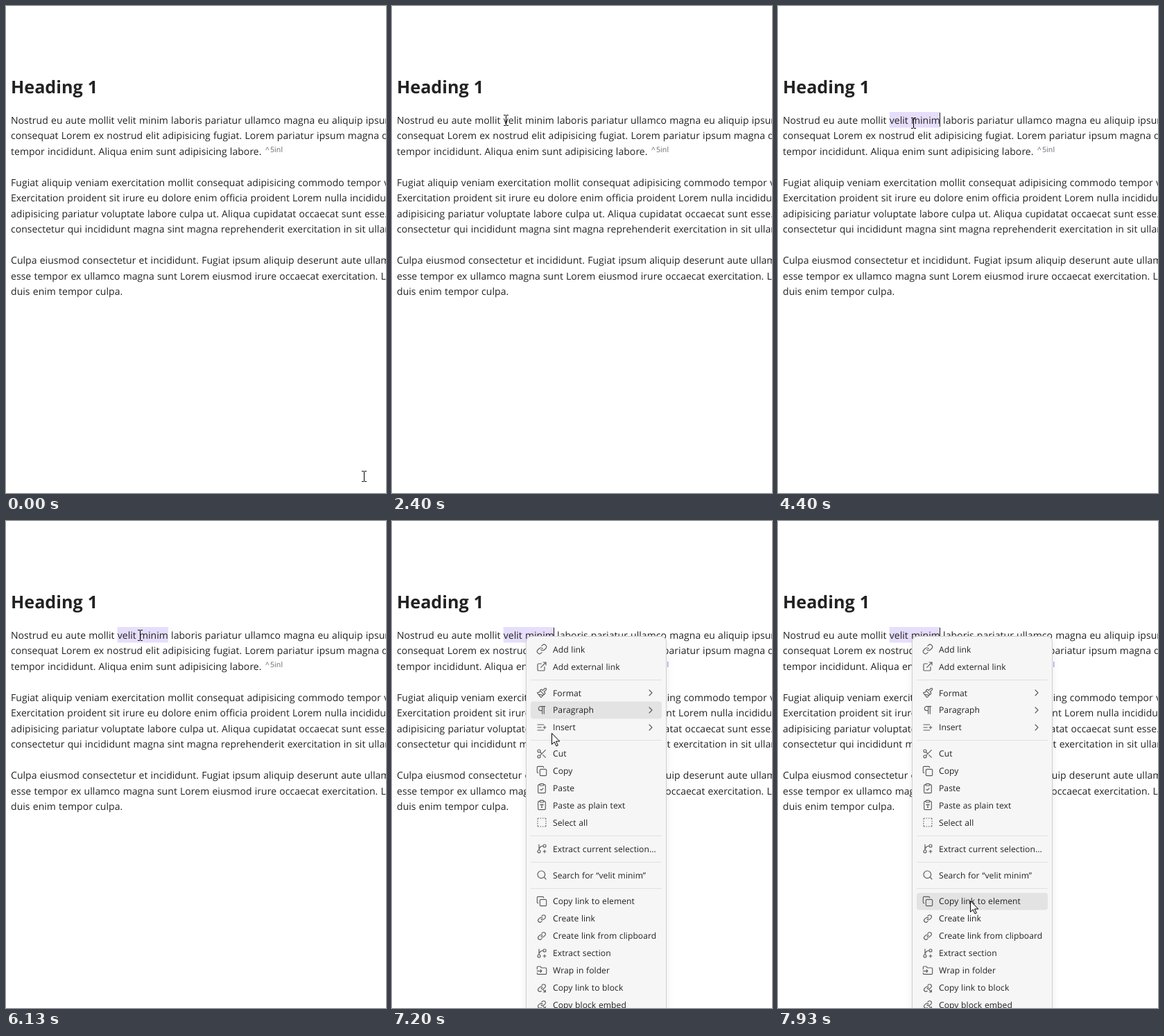
An HTML page for the animation above (8000 ms loop, 548 px wide and 703 px high).

```html
<!DOCTYPE html>
<html lang="en">
<head>
<meta charset="utf-8">
<title>Context menu</title>
<style>
  html, body { margin: 0; width: 100%; height: 100%; overflow: hidden; background: #fff; }
  svg { display: block; }
  text { font: 14px "Open Sans", "Noto Sans", sans-serif; fill: #222; letter-spacing: .05px; word-spacing: .45px; text-rendering: geometricPrecision; }
  .heading { font-size: 25.2px; font-weight: 700; letter-spacing: 0; }
  .block-id { font-size: 10.6px; fill: #6b6570; }
  .open .block-id { fill: #8a5cf5; }
  .panel { fill: #f6f6f6; stroke: #cfcfcf; filter: drop-shadow(0 2px 5px rgb(0 0 0 / .08)); }
  #menu { display: none; }
  .open #menu { display: inline; }
  #menu text { font-size: 12.13px; word-spacing: .4px; }
  .icon { fill: none; stroke: #5c5c5c; stroke-width: 1.75; stroke-linecap: round; stroke-linejoin: round; }
</style>
</head>
<body>
<svg id="stage" width="548" height="703" viewBox="0 0 548 703">
  <rect id="selection" y="153" height="22.5" fill="#e7defb"/>
  <g id="page">
    <text class="heading" x="7" y="125.5">Heading 1</text>
    <text class="block-id" x="374" y="211">^<tspan x="381">5inl</tspan></text>
  </g>
  <rect id="caret" y="154" width="1" height="20" fill="#222"/>
  <g id="menu">
    <rect class="panel" x="193.5" y="166.5" width="202" height="600" rx="8"/>
    <rect id="hover" x="200" width="189" height="24.9" rx="4" fill="#e3e3e3"/>
  </g>
  <path id="beam" d="M-3 -7.5h3m1 0h3M.5 -7v14M-3 7.5h3m1 0h3" fill="none" stroke="#000"/>
  <path id="arrow" d="M.5 .5v16l3.7-3.6 2.8 6 2.3-1-2.8-5.9h5.3z" fill="#fff" stroke="#000"/>
</svg>
<script>
const $ = id => document.getElementById(id);
const stage = $('stage');

function add(parent, tag, attrs, content = '') {
  const el = document.createElementNS('http://www.w3.org/2000/svg', tag);
  for (const name in attrs) el.setAttribute(name, attrs[name]);
  el.textContent = content;
  parent.append(el);
  return el;
}
function set(el, attrs) {
  for (const name in attrs) el.setAttribute(name, attrs[name]);
}

// Document text; empty strings are blank lines
const lines = [
  'Nostrud eu aute mollit velit minim laboris pariatur ullamco magna eu aliquip ipsum',
  'consequat Lorem ex nostrud elit adipisicing fugiat. Lorem pariatur ipsum magna dolor',
  'tempor incididunt. Aliqua enim sunt adipisicing labore.',
  '',
  'Fugiat aliquip veniam exercitation mollit consequat adipisicing commodo tempor velit',
  'Exercitation proident sit irure eu dolore enim officia proident Lorem nulla incididunt',
  'adipisicing pariatur voluptate labore culpa ut. Aliqua cupidatat occaecat sunt esse.',
  'consectetur qui incididunt magna sint magna reprehenderit exercitation in sit ullamco',
  '',
  'Culpa eiusmod consectetur et incididunt. Fugiat ipsum aliquip deserunt aute ullamco',
  'esse tempor ex ullamco magna sunt Lorem eiusmod irure occaecat exercitation. Labore',
  'duis enim tempor culpa.',
].map((line, i) => add($('page'), 'text', { x: 7, y: Math.floor(170 + 22.5 * i) }, line));

const clipboard = 'M9 2h6a1 1 0 0 1 1 1v2a1 1 0 0 1-1 1H9a1 1 0 0 1-1-1V3a1 1 0 0 1 1-1zM16 4h2a2 2 0 0 1 2 2v14a2 2 0 0 1-2 2H6a2 2 0 0 1-2-2V6a2 2 0 0 1 2-2h2';
const smallLink = 'M10.5 13a4 4 0 0 0 6 .4l2.4-2.4a4 4 0 0 0-5.7-5.7l-1.3 1.4M13.5 11a4 4 0 0 0-6-.4l-2.4 2.4a4 4 0 0 0 5.7 5.7';
const icons = {
  link: 'M10 13a5 5 0 0 0 7.54.54l3-3a5 5 0 0 0-7.07-7.07l-1.72 1.71M14 11a5 5 0 0 0-7.54-.54l-3 3a5 5 0 0 0 7.07 7.07l1.71-1.71',
  external: 'M15 3h6v6M10 14 21 3M18 13v6a2 2 0 0 1-2 2H5a2 2 0 0 1-2-2V8a2 2 0 0 1 2-2h6',
  brush: 'M18.37 2.63 14 7l-1.59-1.59a2 2 0 0 0-2.82 0L8 7l9 9 1.59-1.59a2 2 0 0 0 0-2.82L17 10l4.37-4.37a2.12 2.12 0 1 0-3-3ZM9 8c-2 3-4 3.5-7 4l8 10c2-1 6-5 6-7M14.5 17.5 4.5 15',
  pilcrow: 'M13 4v16M17 4v16M19 4H9.5a4.5 4.5 0 0 0 0 9H13',
  insert: 'M11 12H3M16 6H3M16 18H3M18 9v6M21 12h-6',
  scissors: 'M9 6a3 3 0 1 1-6 0 3 3 0 0 1 6 0zM9 18a3 3 0 1 1-6 0 3 3 0 0 1 6 0zM20 4 8.12 15.88M14.47 14.48 20 20M8.12 8.12 12 12',
  copy: 'M10 8h10a2 2 0 0 1 2 2v10a2 2 0 0 1-2 2H10a2 2 0 0 1-2-2V10a2 2 0 0 1 2-2zM4 16c-1.1 0-2-.9-2-2V4c0-1.1.9-2 2-2h10c1.1 0 2 .9 2 2',
  paste: clipboard + 'M9 14l2 2 4-4',
  plain: clipboard + 'M9 12v-1h6v1M11 17h2M12 11v6',
  dashed: 'M5 3a2 2 0 0 0-2 2M19 3a2 2 0 0 1 2 2M21 19a2 2 0 0 1-2 2M5 21a2 2 0 0 1-2-2M9 3h1M9 21h1M14 3h1M14 21h1M3 9v1M21 9v1M3 14v1M21 14v1',
  branch: 'M6 3v12M18 9a3 3 0 1 0 0-6 3 3 0 0 0 0 6zM6 21a3 3 0 1 0 0-6 3 3 0 0 0 0 6zM15 6a9 9 0 0 0-9 9M18 15v6M21 18h-6',
  search: 'M19 11a8 8 0 1 1-16 0 8 8 0 0 1 16 0zM21 21l-4.3-4.3',
  small: smallLink + 'l1.3-1.4',
  folder: 'M2 9V5a2 2 0 0 1 2-2h3.9a2 2 0 0 1 1.69.9l.81 1.2a2 2 0 0 0 1.67.9H20a2 2 0 0 1 2 2v10a2 2 0 0 1-2 2H4a2 2 0 0 1-2-2v-1M2 13h10M9 16l3-3-3-3',
  block: smallLink + 'M15 16l5 5M20 16.5V21h-4.5',
  chevron: 'M9 18l6-6-6-6',
};

const ROW = 24.9, SEPARATOR = 13;
const groups = [
  ['link:Add link', 'external:Add external link'],
  ['brush:Format:more', 'pilcrow:Paragraph:more', 'insert:Insert:more'],
  ['scissors:Cut', 'copy:Copy', 'paste:Paste', 'plain:Paste as plain text', 'dashed:Select all'],
  ['branch:Extract current selection...'],
  ['search:Search for “velit minim”'],
  ['copy:Copy link to element', 'small:Create link', 'small:Create link from clipboard', 'branch:Extract section',
    'folder:Wrap in folder', 'block:Copy link to block', 'block:Copy block embed'],
];
const rowTops = [];

function addIcon(name, x, y) {
  add($('menu'), 'path', { class: 'icon', d: icons[name], transform: `translate(${x} ${y}) scale(.6667)` });
}
let top_ = 172.9;
groups.forEach((group, i) => {
  if (i) {
    add($('menu'), 'rect', { x: 200, y: Math.round(top_ + 6), width: 189, height: 1, fill: '#e0e0e0' });
    top_ += SEPARATOR;
  }
  for (const item of group) {
    const [icon, label, more] = item.split(':');
    const iconTop = Math.round(top_ + 4.4);
    addIcon(icon, 208, iconTop);
    add($('menu'), 'text', { x: 232, y: Math.round(top_ + 16.8) }, label);
    if (more) addIcon('chevron', 365, iconTop);
    rowTops.push(top_);
    top_ += ROW;
  }
});

// Pointer keys: tick, x, y, eased arrival
const TICKS = 120, LOOP = 8000;
const DRAG = 46, DRAG_END = 55, MENU = 100, ARROW = 103;
const keys = [
  [0, 516, 679], [13, 133, 283, 1], [15, 133, 283], [28, 165, 165, 1], [35, 165, 165], [36, 164, 165],
  [45, 164, 165], [55, 233, 169, 1], [61, 233, 169], [63, 222, 176], [66, 195, 169], [69, 195, 166],
  [89, 195, 166], [92, 193, 165], [102, 193, 165], [103, 194, 169], [105, 207, 215], [107, 222, 275],
  [108, 230, 306], [109, 240, 360], [110, 254, 425], [111, 268, 470], [112, 277, 493], [113, 277, 510],
  [114, 277, 522], [115, 277, 531], [119, 277, 548],
];
function pointerAt(tick) {
  const i = Math.max(1, keys.findIndex(key => key[0] >= tick));
  const [t0, x0, y0] = keys[i - 1], [t1, x1, y1, eased] = keys[i];
  let p = (tick - t0) / (t1 - t0);
  if (eased) p = p * p * (3 - 2 * p);
  return { x: Math.round(x0 + (x1 - x0) * p), y: Math.round(y0 + (y1 - y0) * p) };
}

const WORDS = 'velit minim';
const wordStart = lines[0].textContent.indexOf(WORDS);
const charX = offset => lines[0].getStartPositionOfChar(wordStart + offset).x;

// Nearest character boundary to the dragged pointer
function selectionHead(tick, pointerX) {
  if (tick >= DRAG_END) return charX(WORDS.length);
  let best = charX(0);
  if (tick < DRAG) return best;
  for (let i = 1; i <= WORDS.length; i++) {
    if (Math.abs(charX(i) - pointerX) < Math.abs(best - pointerX)) best = charX(i);
  }
  return best;
}

function draw(time) {
  const tick = Math.floor(time % LOOP * TICKS / LOOP + .1) % TICKS;
  const { x, y } = pointerAt(tick);

  const start = charX(0), head = selectionHead(tick, x);
  const caretOn = tick >= 43 && (tick < DRAG || Math.floor((tick - DRAG) / 9) % 2 === 0);
  set($('selection'), { x: start, width: tick >= DRAG ? head - start : 0 });
  set($('caret'), { x: Math.floor(head - .5), opacity: caretOn ? 1 : 0 });

  stage.classList.toggle('open', tick >= MENU);
  const isArrow = tick >= ARROW;
  set($('beam'), { transform: `translate(${x} ${y})`, opacity: isArrow ? 0 : 1 });
  set($('arrow'), { transform: `translate(${x} ${y})`, opacity: isArrow ? 1 : 0 });

  // The highlight trails the pointer by one tick
  const trailing = tick > ARROW ? pointerAt(tick - 1).y : 0;
  const rowTop = rowTops.find(rowY => trailing >= rowY && trailing < rowY + ROW);
  set($('hover'), { y: rowTop || 0, opacity: rowTop ? 1 : 0 });
}

const began = performance.now();
function loop() {
  draw(performance.now() - began);
  requestAnimationFrame(loop);
}
loop();
</script>
</body>
</html>
```
